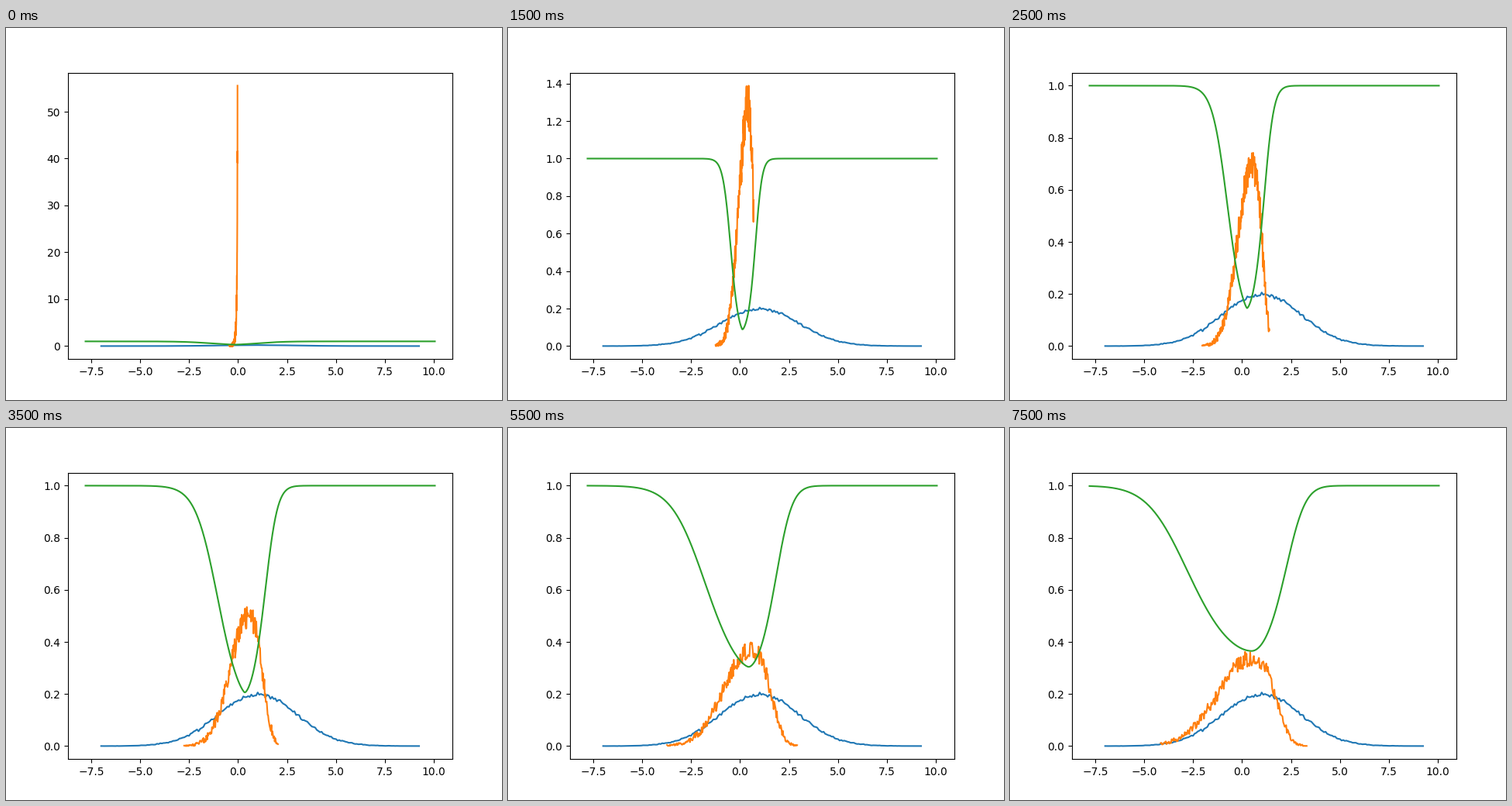
A matplotlib script for the animation above (8000 ms loop, 640x480 px).

```python
import numpy as np
import matplotlib.pyplot as plt
from matplotlib.animation import FuncAnimation

FRAMES, STEP_MS = 16, 500
X_MIN, X_MAX = -7.80, 10.06
BINS = 200


def real_histogram():
    x = np.linspace(-7.0, 9.25, BINS)
    pdf = np.exp(-0.5 * ((x - 1) / 2) ** 2) / np.sqrt(8 * np.pi)
    scale = 150000 * (x[1] - x[0])
    return x, np.random.default_rng(7).poisson(pdf * scale) / scale


def discriminator(x, t):
    """Logit valley that sharpens at once, then slowly rises and widens."""
    untrained = np.exp(-2 * t)
    floor = -0.25 - 2.1 * np.exp((3 - t) / 6.2) + 2.8 * untrained
    d = x - (0.52 - 0.73 * np.exp(-t / 5))
    left = 0.0567 * t ** 1.45 + untrained
    right = 0.04 + 0.1 * t + untrained
    wall = np.where(d < 0,
                    (np.abs(d) / left) ** (1.15 + 0.0031 * t * t),
                    (np.abs(d) / right) ** (1.25 + 0.05 * t))
    return 1 / (1 + np.exp(-floor - wall))


def generator(t):
    """Noisy density that spreads from a spike into a skewed bell."""
    grown = 1 - np.exp(-(t / 7.5) ** 1.6)
    low, high = -0.45 - 3.9 * grown, -0.03 + 3.5 * grown
    mode = min(high, 0.5 * np.tanh(1.5 * high))
    left = 0.005 + (0.2 + 0.1 * t) * (1 - np.exp(-t ** 3 / 13))
    right = 0.05 + 1.15 * grown
    power = 2 - 1.4 * np.exp(-t / 1.2)
    peak = 1 / (0.018 + 3.55 * grown - 0.7 * grown ** 2)

    x = np.linspace(low, high, BINS)
    d = x - mode
    shape = np.where(d < 0,
                     np.exp(-0.5 * (np.abs(d) / left) ** power),
                     np.exp(-0.5 * (np.abs(d) / right) ** 2.8))
    noise = np.random.default_rng(40 + t).uniform(-0.1, 0.1, BINS)
    y = np.maximum(shape + noise * np.sqrt(shape), 0)
    return x, y * peak / y.max()


fig, ax = plt.subplots(figsize=(6.4, 4.8), dpi=100)
grid = np.linspace(X_MIN, X_MAX, 500)
ax.plot(*real_histogram(), color="tab:blue")
fake_line, = ax.plot([], [], color="tab:orange")
disc_line, = ax.plot([], [], color="tab:green")
pad = 0.05 * (X_MAX - X_MIN)
ax.set_xlim(X_MIN - pad, X_MAX + pad)


def update(step):
    x, y = generator(step)
    fake_line.set_data(x, y)
    disc_line.set_data(grid, discriminator(grid, step))
    top = max(1.0, y.max())
    ax.set_ylim(-0.05 * top, 1.05 * top)
    return fake_line, disc_line


anim = FuncAnimation(fig, update, frames=FRAMES, interval=STEP_MS,
                     repeat=True, repeat_delay=0, blit=False)
plt.show()
```
